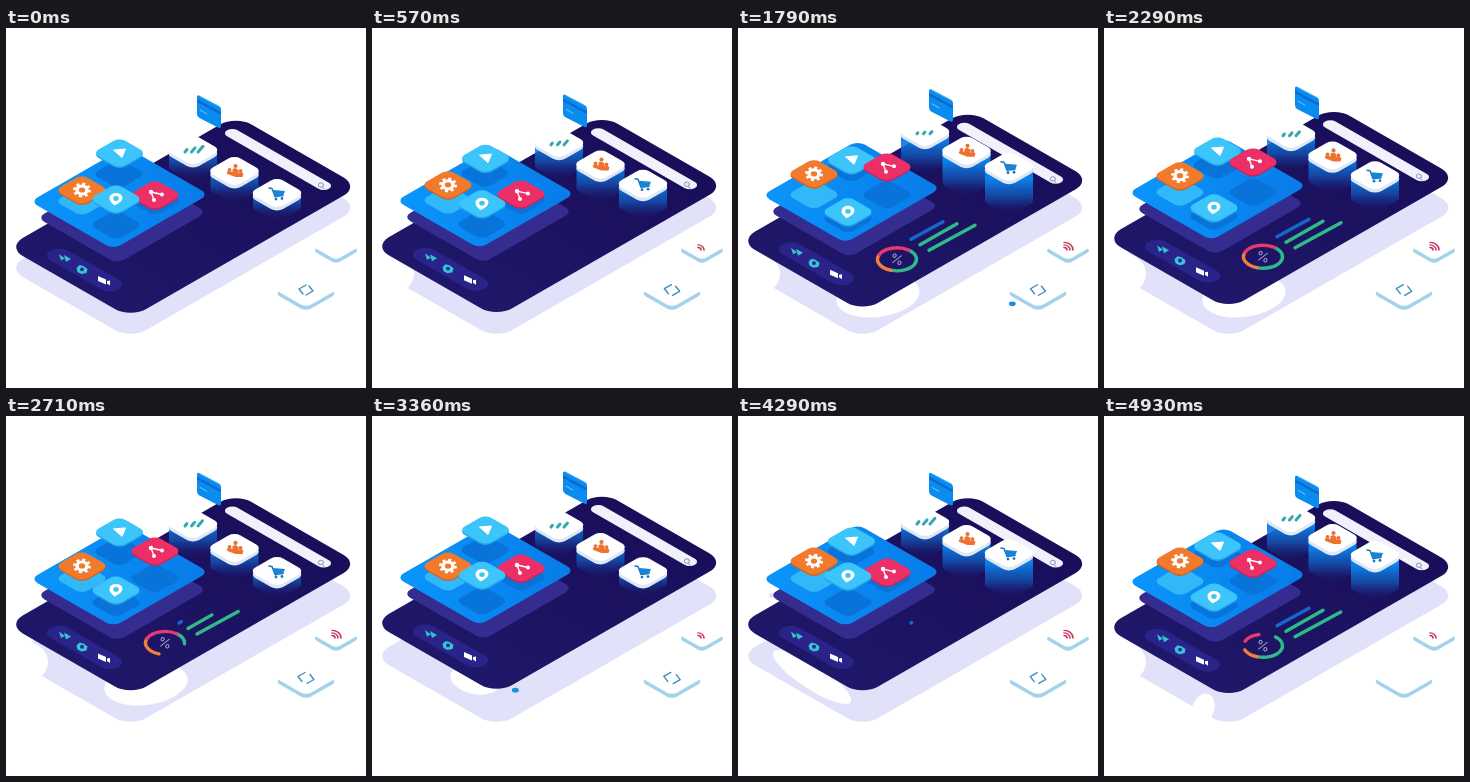
An HTML page for the animation above (5000 ms loop, 360 by 360 pixels).

```html
<!DOCTYPE html>
<html lang="en">
<head>
<meta charset="utf-8">
<title>Isometric phone</title>
<style>
  html, body { margin: 0; width: 100%; height: 100%; overflow: hidden; background: #fff; }
  svg { display: block; width: 100vw; height: 100vh; }
  .line { fill: none; stroke-linecap: round; stroke-linejoin: round; }
  text { font: 15px Inter, Arial, sans-serif; text-anchor: middle; }
</style>
</head>
<body>
<svg id="stage" viewBox="0 0 360 360">
  <defs>
    <linearGradient id="screen" x1="0" y1="1" x2="0" y2="0">
      <stop stop-color="#1f1769"/><stop offset="1" stop-color="#190e5a"/>
    </linearGradient>
    <linearGradient id="board" x1="0" y1="1" x2="1" y2="0">
      <stop stop-color="#0a96fa"/><stop offset="1" stop-color="#087be8"/>
    </linearGradient>
    <linearGradient id="beam" gradientUnits="userSpaceOnUse" x1="0" y1="-22" x2="0" y2="14">
      <stop stop-color="#0b82ea"/>
      <stop offset=".5" stop-color="#1260c4" stop-opacity=".65"/>
      <stop offset="1" stop-color="#1a1a70" stop-opacity="0"/>
    </linearGradient>
  </defs>
</svg>
<script>
const LOOP = 5000, STEP = LOOP / 70;
const KEYS = [0, 1070, 1790, 2710, 3360, 4290, 4930];
const stage = document.getElementById('stage');
const clamp = v => Math.max(0, Math.min(1, v));
const ease = v => (1 - Math.cos(Math.PI * clamp(v))) / 2;
const within = (t, spans) => spans.some(([a, b]) => t >= a && t < b);
const move = (el, x, y) => el.setAttribute('transform', `translate(${x} ${y.toFixed(2)})`);
const show = (el, on) => el.setAttribute('visibility', on ? 'visible' : 'hidden');

// Smooth curve through one value per key time.
function curve(vals, t) {
  const last = KEYS.length - 1;
  if (t >= KEYS[last]) return vals[last];
  const i = KEYS.findIndex((k, n) => t < KEYS[n + 1]);
  const slope = n => n === 0 || n === last ? 0
    : (vals[n + 1] - vals[n - 1]) / (KEYS[n + 1] - KEYS[n - 1]);
  const d = KEYS[i + 1] - KEYS[i], s = (t - KEYS[i]) / d, s2 = s * s, s3 = s2 * s;
  return (2 * s3 - 3 * s2 + 1) * vals[i] + (s3 - 2 * s2 + s) * d * slope(i)
    + (3 * s2 - 2 * s3) * vals[i + 1] + (s3 - s2) * d * slope(i + 1);
}

function add(parent, markup) {
  parent.insertAdjacentHTML('beforeend', markup);
  return parent.lastElementChild;
}

// Rounded rectangle lying on the isometric floor, centred on x, y.
const slab = (x, y, w, h, r, fill, extra = '') =>
  `<rect x="${-w / 2}" y="${-h / 2}" width="${w}" height="${h}" rx="${r}" fill="${fill}" ${extra}
    transform="matrix(.87 .5 -.87 .5 ${x} ${y})"/>`;
const line = (d, color, width) =>
  `<path class="line" d="${d}" stroke="${color}" stroke-width="${width}"/>`;
const dot = (x, y, r, fill) => `<circle cx="${x}" cy="${y}" r="${r}" fill="${fill}"/>`;

// Floor shadow with the clear patches that cut into it.
add(stage, slab(177.2, 209.8, 142, 263, 18, '#e2e1fa'));
const patches = [
  [14, 246, 28, 22, 0, [[500, 3000], [4600, 5000]]],
  [99, 293, 11, 16, 20, [[700, 1450], [4600, 5000]]],
  [169, 284, 10, 14, 20, [[700, 1450]]],
  [140, 268, 42, 21, -8, [[1450, 3000]]],
  [103, 264, 25, 14, 12, [[3000, 3900]]],
  [74, 261, 46, 12, 33, [[3900, 4600]]]
].map(([x, y, rx, ry, turn, spans]) => ({
  spans,
  el: add(stage, `<ellipse rx="${rx}" ry="${ry}" fill="#fff" transform="translate(${x} ${y}) rotate(${turn})"/>`)
}));

// Small floor tiles on the right.
const RIM = '#a3d3ea';
const floorTile = (x, y, s, r) => slab(x, y + 4, s, s, r, RIM) + slab(x, y, s, s, r, '#fff');
add(stage, `<g>${floorTile(300, 261.5, 36, 6)}${floorTile(330, 218.5, 27, 5)}</g>`);
const wifi = add(stage, `<g transform="translate(326 222) scale(1 .85)">${
  [3, 6, 9].map(r => line(`M0 ${-r}A${r} ${r} 0 0 1 ${r} 0`, '#c5355a', 1.6)).join('')}</g>`);
const code = add(stage, `<g transform="translate(300 262)">${
  line('M0-5L-7-1L-3 4', '#3f8fbd', 1.4)}${line('M0 5L7 1L3-4', '#3f8fbd', 1.4)}</g>`);
const spark = add(stage, '<ellipse rx="3.4" ry="2.4"/>');

// Everything on the phone floats together.
const phone = add(stage, '<g></g>');
add(phone, slab(177.2, 176.8, 142, 263, 18, 'url(#screen)'));
add(phone, slab(272, 119.5, 117, 12, 6, '#f1f1fb'));
add(phone, `<g>${line('M317.5 145a2.6 2.2 0 1 1-5.2 0a2.6 2.2 0 1 1 5.2 0M316.5 147l1.5 2.2', '#8e94bd', 1)}</g>`);

// Navigation pill.
add(phone, slab(78.5, 230, 78, 20, 10, '#29238a'));
add(phone, `<g>
  <path d="M53 214l6 4.5-4 2zM58 215l7 4-5 3z" fill="#35c3c9"/>
  <path d="M70.500 228l3-3 4 1 4 3-1 4-5 1-4-2z" fill="#35c5d8"/>${dot(76, 229.300, 1.900, '#29238a')}
  <path d="M92 236l8 3.500 0 5-8-3.500zM101 241l3-.5v5l-3-2z" fill="#fff"/></g>`);

// Statistics.
const stats = [
  ['M173 205.500L205 188', '#1767cb', 600, 380, 2450, 320],
  ['M182 211L219 190', '#2fbb86', 720, 420, 2560, 380],
  ['M191 216.500L237 191.500', '#2fbb86', 830, 470, 2620, 450],
  [arc(-50, 105), '#2fb98a', 700, 380, 2450, 420],
  [arc(108, 200), '#f0803a', 1000, 480, 2750, 350],
  [arc(203, 307), '#e8386c', 1060, 440, 2850, 350]
].map(([d, color, on, grow, off, shrink]) => ({
  on, grow, off, shrink,
  el: add(phone, `<path class="line" d="${d}" pathLength="100" stroke="${color}" stroke-width="3.400"/>`)
}));
const percent = add(phone, '<text fill="#a3a2d4">%</text>');

function arc(from, to) {
  const at = a => `${159 + 19.5 * Math.cos(a * Math.PI / 180)} ${225.5 + 11.5 * Math.sin(a * Math.PI / 180)}`;
  return `M${at(from)}A19.5 11.5 0 0 1 ${at(to)}`;
}

// Standing card.
add(phone, `<g>
  <path d="M191 57Q191 54.500 193.500 55.800L213 66Q215 67 215 69.500V86Q215 89 212.500 87.800L193.500 78Q191 76.500 191 74Z" fill="#0a8bf0"/>
  ${line('M192 61L214 73', '#0869c9', 2.2)}${line('M194 56.500L213 66.500', '#4bbcfa', .8)}
  ${line('M194 70L201 74', '#6accff', 1)}</g>`);

// White tiles on beams of light.
const barIcon = `<g>${[[-8, 1], [-1, 1], [5, 1]].map(([x, y], i) =>
  line(`M${x} ${y + 1}l${2 + i * 1.5} ${-2.5 - i * 1.6}`, '#35a7ae', 3)).join('')}</g>`;
const crowdIcon = `<g>${dot(-5, -1, 1.9, '#ee7130')}${dot(1, -5, 2.1, '#ee7130')}${dot(6, 0, 1.9, '#ee7130')}
  <path d="M-8 1l3-1 3 1 0-3 3-1 3 2 0 3 3-1 2 2-1 3-7 0-8-3z" fill="#ee7130"/></g>`;
const cartIcon = `<g>${line('M-8-5l3 .5 3 8 8-1', '#1976c6', 1.5)}
  <path d="M-4-3l12 1-2 5-8 0z" fill="#1685d8"/>${dot(-1, 6, 1.4, '#1976c6')}${dot(5, 5.5, 1.4, '#1976c6')}</g>`;
const towers = [
  [187, 127, barIcon, [110, 96.6, 98, 106.5, 109, 104.6, 97.7]],
  [228.500, 149, crowdIcon, [131, 118.6, 117, 130.5, 131, 121.6, 117.7]],
  [271, 167, cartIcon, [153, 134.6, 133, 153.5, 155, 135.6, 134.7]]
].map(([x, base, icon, ys]) => ({
  x, base, ys,
  beam: add(add(phone, `<g transform="translate(${x} ${base})"></g>`), '<path fill="url(#beam)"/>'),
  tile: add(phone, `<g>${slab(0, 3.5, 32, 32, 7, '#dfe6f5')}${slab(0, 0, 32, 32, 7, '#fff')}${icon}</g>`)
}));
const bars = [...towers[0].tile.querySelectorAll('path')];

// Blue board with four floating tiles.
add(phone, slab(116, 175, 92, 103, 8, '#342c8f'));
add(phone, slab(113.500, 158, 95.5, 109.5, 8, 'url(#board)'));
[[113, 134, '#0874da'], [76, 161, '#31b8f8'], [149, 161, '#0874da'], [110, 185, '#0874da']]
  .forEach(([x, y, c]) => add(phone, slab(x, y, 31, 31, 7, c)));

const playIcon = '<path d="M-6-3L6-4L2.500 4.500Z" fill="#fff" stroke="#fff" stroke-linejoin="round"/>';
const gearIcon = `<g transform="scale(1 .82)" fill="none" stroke="#fff">
  <circle r="5" stroke-width="3.600"/><circle r="7.600" stroke-width="2.800" stroke-dasharray="3 2.970"/></g>`;
const shareIcon = `<g>${line('M7-.5L-4-3L-1 5', '#fff', 1.4)}${dot(7, -.5, 2, '#fff')}${dot(-4, -3, 2.2, '#fff')}${dot(-1, 5, 2, '#fff')}</g>`;
const pinIcon = `<path fill="#fff" fill-rule="evenodd"
  d="M-1.500 6.500Q-7 2-6.500-1A6.500 5 0 0 1 6.500-1Q6 3-1.500 6.500ZM-2.800-.5a2.800 2.400 0 1 0 5.600 0a2.800 2.400 0 1 0-5.600 0Z"/>`;
const apps = [
  [113.500, '#3cc5fa', '#25a3ea', playIcon, [113, 125.6, 126, 114.5, 114, 123.6, 125.7]],
  [76, '#f27a2c', '#d9601f', gearIcon, [150, 140.6, 140, 148.5, 150, 143.6, 140.7]],
  [149, '#ec2f66', '#c92458', shareIcon, [155, 151.6, 133, 133.5, 152, 154.6, 142.7]],
  [110, '#3cc5fa', '#25a3ea', pinIcon, [159, 171.6, 178, 172.5, 159, 158.6, 176.7]]
].map(([x, top, side, icon, ys]) => ({
  x, ys,
  el: add(phone, `<g>${slab(0, 1.5, 31, 31, 7, side)}${slab(0, 0, 31, 31, 7, top)}${icon}</g>`)
}));

function draw(t) {
  move(phone, 0, 6 + 6 * Math.cos(t / 7000 * 2 * Math.PI));
  for (const app of apps) move(app.el, app.x, curve(app.ys, t));

  for (const { x, base, ys, beam, tile } of towers) {
    const y = curve(ys, t), top = y - base;
    move(tile, x, y);
    beam.setAttribute('d', `M-24 ${top}V0Q-24 2-21 3.500L-4 13Q0 15 4 13L21 3.500Q24 2 24 0V${top}Z`);
  }
  const tall = curve([1, .35, .4, .9, .7, 1, .8], t);
  bars.forEach((bar, i) => {
    bar.setAttribute('d', `M${-8 + i * 6.5} 2l${(2 + i * 1.5) * tall} ${(-2.5 - i * 1.6) * tall}`);
  });

  const s = t > 3700 ? t - 3650 : t;
  for (const { el, on, grow, off, shrink } of stats) {
    const part = ease((s - on) / grow) - ease((s - off) / shrink);
    el.setAttribute('stroke-dasharray', `${part * 100} 200`);
    show(el, part > .01);
  }
  const size = ease((s - 850) / 450) - ease((s - 2800) / 350);
  show(percent, size > .02);
  percent.setAttribute('transform', `translate(159 225.500) scale(${size}) matrix(.9 .25 -.25 .85 0 0) translate(0 5.300)`);

  for (const { el, spans } of patches) show(el, within(t, spans));

  show(wifi, t > 350);
  show(wifi.lastElementChild, within(t, [[800, 3000], [3900, 4600]]));
  show(code, t < 4600);
  const gap = curve([0, 1.2, .5, 1, 1.2, .8, .8], t);
  move(code.firstElementChild, -gap, -gap / 2);
  move(code.lastElementChild, gap, gap / 2);

  const xs = [330, 323, 274, 205, 143, 34, 20], ys = [232, 242, 276, 296, 274, 179, 165];
  move(spark, curve(xs, t), curve(ys, t));
  show(spark, within(t, [[900, 2000], [3150, 3650], [4150, 4450]]));
  spark.setAttribute('fill', t > 4000 ? '#dedcf8' : '#1493e0');
}

const start = performance.now();
function tick() {
  const t = (performance.now() - start) % LOOP;
  draw(Math.floor((t + 5) / STEP) * STEP % LOOP);
  requestAnimationFrame(tick);
}
tick();
</script>
</body>
</html>
```
